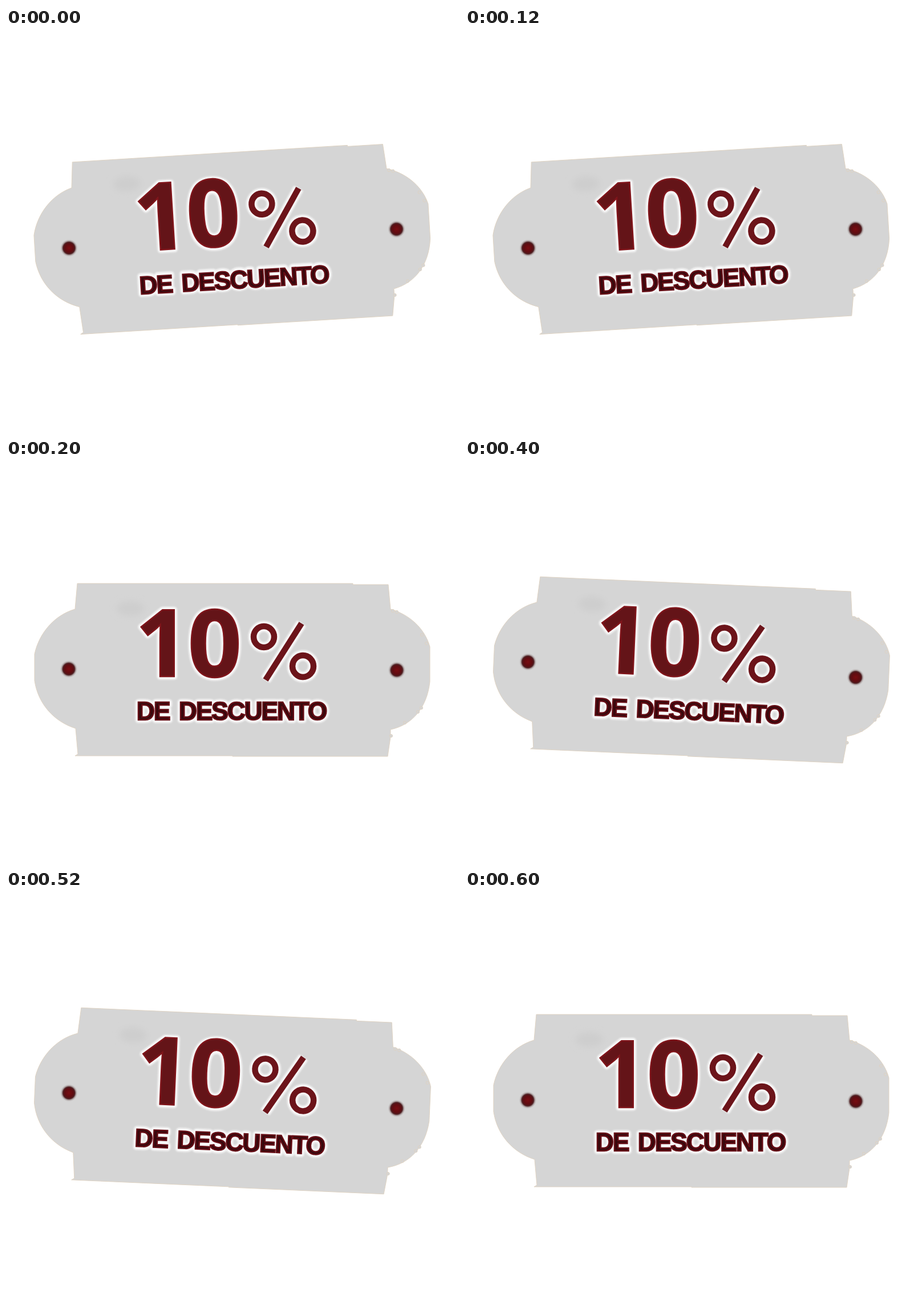
Animation of 794 by 706 pixels, one loop 800 ms. Source, as an HTML page:

```html
<!DOCTYPE html>
<html lang="es">
<head>
<meta charset="utf-8">
<title>10% de descuento</title>
<style>
html, body { margin: 0; width: 100%; height: 100%; overflow: hidden; background: #fff; }
svg { display: block; width: 100vw; height: 100vh; }
.big {
  font: bold 164px "Open Sans", "Noto Sans", sans-serif;
  fill: var(--big); stroke: var(--big-edge); stroke-width: calc(2.5px + var(--grow));
}
.small {
  font: bold 44px "Liberation Sans", Arial, sans-serif; letter-spacing: -1.9px;
  fill: var(--small); stroke: var(--small-edge); stroke-width: calc(2.4px + var(--grow));
}
.pct { fill: none; stroke: var(--pct); stroke-width: calc(10.5px + var(--grow)); }
.halo {
  --big: #fff; --big-edge: #fff; --small: #fff; --small-edge: #fff; --pct: #fff; --grow: 8px;
  stroke-linejoin: round; opacity: .85; filter: url(#soft);
}
.ink {
  --big: #641418; --big-edge: #80151b; --small: #38080d; --small-edge: #650e16; --pct: #6c141a; --grow: 0px;
}
</style>
</head>
<body>
<svg viewBox="0 0 794 706">
  <defs>
    <filter id="soft"><feGaussianBlur stdDeviation="1.5"/></filter>
    <filter id="haze" x="-50%" y="-50%" width="200%" height="200%"><feGaussianBlur stdDeviation="6"/></filter>
    <radialGradient id="dot">
      <stop offset="0" stop-color="#780d12"/>
      <stop offset=".5" stop-color="#5e0c11"/>
      <stop offset=".68" stop-color="#4d1c1f"/>
      <stop offset=".85" stop-color="#b5adad"/>
      <stop offset="1" stop-color="#d5d5d5"/>
    </radialGradient>
    <g id="words">
      <text class="big" y="381"><tspan x="227">1</tspan><tspan x="319">0</tspan></text>
      <g class="pct">
        <ellipse cx="452" cy="311.5" rx="18" ry="18.5"/>
        <ellipse cx="520.5" cy="363" rx="18.5" ry="19"/>
        <path d="M518 288L455 387"/>
      </g>
      <text class="small" y="456.5"><tspan x="229">DE </tspan><tspan x="303">DESCUENTO</tspan></text>
    </g>
  </defs>
  <g id="tag">
    <g fill="#d5d5d5" stroke="#dfd2c0" stroke-width=".9">
      <path d="M125 218H608V220H670L674 263C706 272 734 296 743 329V390C738 436 712 466 674 474V487L669 521H397V520H121L126 517L122 472C84 460 56 429 50 388V342C58 304 86 273 121 263Z"/>
      <g id="nicks"></g>
    </g>
    <ellipse cx="218" cy="262" rx="24" ry="13" fill="#cecece" filter="url(#haze)"/>
    <circle cx="110" cy="368" r="15" fill="url(#dot)"/>
    <circle cx="685" cy="370" r="15" fill="url(#dot)"/>
    <use href="#words" class="halo"/>
    <use href="#words" class="ink"/>
  </g>
</svg>
<script>
const tag = document.getElementById("tag");
const angles = [-3.5, 0, 2.5, 0];

// Rough specks along the right edge
document.getElementById("nicks").innerHTML =
  [[678, 266], [685, 268], [729, 308], [737, 323], [728, 436], [722, 443], [699, 462], [675, 485]]
    .map(([x, y]) => `<circle cx="${x}" cy="${y}" r="2.6"/>`).join("");

function draw(now) {
  const angle = angles[Math.floor(now / 200) % angles.length];
  tag.setAttribute("transform", `rotate(${angle} 397 369)`);
  requestAnimationFrame(draw);
}
draw(0);
</script>
</body>
</html>
```
